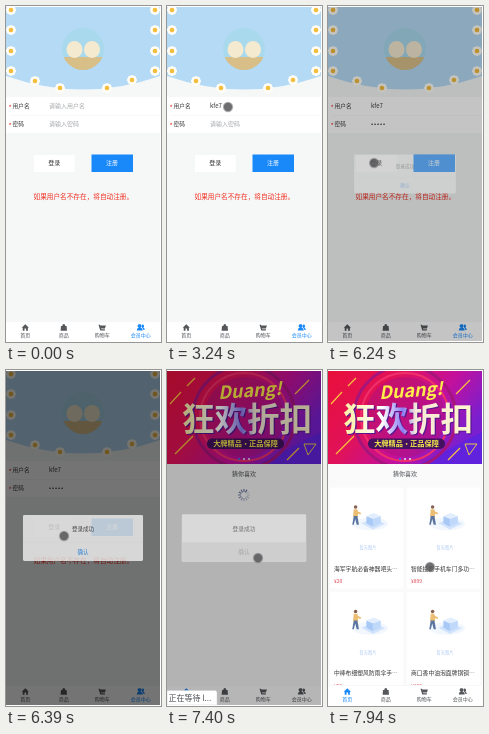
These frames come from a looping animation (155x336 px, 8 s). An HTML page:

```html
<!DOCTYPE html>
<html lang="zh-CN">
<head>
<meta charset="utf-8">
<title>Shop login</title>
<style>
html, body { margin: 0; width: 100%; height: 100%; overflow: hidden; background: #fff; }
svg { display: block; width: 100%; height: 100%; font-family: 'Noto Sans CJK SC', 'Noto Sans CJK', 'Noto Sans', sans-serif; }
#pass { font-family: 'Liberation Sans', sans-serif; letter-spacing: .9px; }
</style>
</head>
<body>
<svg id="stage" viewBox="0 0 155 336"></svg>
<script>
const LOOP = 8000;
const BLUE = '#1989fa', INK = '#323233', HINT = '#a6a8ac', PAGE = '#f6f8f8';

const text = (x, y, size, fill, str, extra = '') =>
  `<text x="${x}" y="${y}" font-size="${size}" fill="${fill}" ${extra}>${str}</text>`;
const mid = (x, y, size, fill, str, extra = '') =>
  text(x, y, size, fill, str, 'text-anchor="middle" ' + extra);
const rect = (x, y, w, h, fill, extra = '') =>
  `<rect x="${x}" y="${y}" width="${w}" height="${h}" fill="${fill}" ${extra}/>`;
const shape = (d, fill, extra = '') => `<path d="${d}" fill="${fill}" ${extra}/>`;
const ring = (n, fn) => Array.from({ length: n }, (_, i) => fn(i * 360 / n, i)).join('');

const defs = `<defs>
  <clipPath id="screen"><rect y="1" width="154" height="334"/></clipPath>
  <clipPath id="avatar"><circle cx="77" cy="43" r="21"/></clipPath>
  <clipPath id="banner"><rect y="1" width="154" height="93"/></clipPath>
  <linearGradient id="bannerFill" x2="1" y2=".45">
    <stop stop-color="#e80f3a"/><stop offset=".4" stop-color="#e0125a"/>
    <stop offset=".7" stop-color="#c4109a"/><stop offset="1" stop-color="#7a1fd0"/>
  </linearGradient>
  <linearGradient id="titleFill">
    <stop offset=".05" stop-color="#fff3b0"/><stop offset=".3" stop-color="#fff"/>
    <stop offset=".46" stop-color="#8a7cf2"/><stop offset=".56" stop-color="#f6e9d8"/>
    <stop offset="1" stop-color="#fff6cc"/>
  </linearGradient>
  <g id="flower">${ring(8, a => `<circle cy="-3.2" r="1.9" fill="#fffdf6" transform="rotate(${a})"/>`)}
    <circle r="3" fill="#fffdf6"/><circle r="2.3" fill="#f3bd3e"/></g>
  <g id="empty">
    <g transform="translate(10.5 9) scale(.72)" opacity=".75">
      <ellipse cx="41" cy="38" rx="25" ry="9" fill="#eef4fd"/>
      ${shape('M29 37 46 30 62 38 45 46Z', '#c3dafb')}
      ${shape('M36 27 45 31V42L36 37Z', '#8bb6f4')}${shape('M45 31 56 27V37L45 42Z', '#abcbf8')}
      ${shape('M36 27 46 23 56 27 45 31Z', '#d9e8fd')}
    </g>
    <g transform="translate(6 4) scale(.74)" opacity=".9">
      ${shape('M24 24H29L30 34H23Z', '#e9b765')}${shape('M24 33H29L31 45H28L26 37 24 45H22Z', '#4a6796')}
      ${shape('M28 26 34 29 33 31 27 29Z', '#e9b765')}<circle cx="26.5" cy="21" r="2.4" fill="#7a5140"/>
    </g>
    ${mid(38, 61.5, 4.2, '#b4cdf3', '暂无图片')}
  </g>
</defs>`;

function header() {
  const spots = [];
  for (const y of [4, 24, 45, 65]) spots.push([5, y], [149, y]);
  spots.push([29, 75], [126, 74], [54, 82], [101, 82]);
  return shape('M0 1H154V70Q77 97 0 70Z', '#b4daf5') +
    spots.map(([x, y]) => `<use href="#flower" x="${x}" y="${y}"/>`).join('') +
    `<g clip-path="url(#avatar)">${rect(56, 22, 42, 42, '#a9d9ec')}${rect(56, 51, 42, 13, '#d8bf88')}
      <ellipse cx="68.5" cy="43.5" rx="8" ry="8.5" fill="#f4ead0"/><ellipse cx="86" cy="43.5" rx="8" ry="8.5" fill="#f4ead0"/></g>`;
}

const field = (y, label, id, hint) => text(2.4, y + 1.4, 7, '#e8352a', '*') +
  text(6.6, y, 5.7, INK, label) +
  text(43, y, 6, HINT, hint, `id="${id}Hint"`) + text(43, y, 6, INK, '', `id="${id}"`);

const loginPage = `<g id="login">${header()}
  ${rect(0, 91, 154, 36, '#fff')}${rect(4, 109, 150, .4, '#ebedf0')}
  ${field(102.2, '用户名', 'user', '请输入用户名')}
  ${field(120.2, '密码', 'pass', '请输入密码')}
  ${rect(28, 149, 40.5, 17, '#fff', 'id="loginBtn"')}${mid(48.3, 159.3, 6, INK, '登录')}
  ${rect(85.5, 148.5, 41.5, 17.5, BLUE)}${mid(106, 159.3, 6, '#fff', '注册')}
  ${text(27.5, 192.5, 6.65, '#f02b1d', '如果用户名不存在，将自动注册。')}
</g>`;

const halo = (r, color, width) =>
  `<circle cx="77" cy="47" r="${r}" fill="none" stroke="${color}" stroke-width="${width}"/>`;

const banner = `<g clip-path="url(#banner)">
  ${rect(0, 1, 154, 93, 'url(#bannerFill)')}
  ${shape('M154 62V94H92Z', '#5a24e0', 'opacity=".8"')}
  <circle cx="77" cy="47" r="40" fill="#b0127e" opacity=".55"/>
  ${halo(44, '#f0306a', 2)}${halo(51, '#a5157c', 3)}
  ${shape('M137 74H149L141 85Z', 'none', 'stroke="#f7d93a" stroke-width=".9"')}
  ${shape('M3 34 14 22M8 84 26 66M128 24 142 10M120 90 132 78M20 16 28 8', 'none', 'stroke="#ffc23d" stroke-width="1.2"')}
  ${mid(83, 27, 18, '#ffee4a', 'Duang!', 'font-weight="700" font-style="italic" transform="rotate(-4 83 22)"')}
  ${mid(80, 61, 32.5, '#5a1590', '狂欢折扣', 'font-weight="900" transform="translate(1.2 1.2)"')}
  ${mid(80, 61, 32.5, 'url(#titleFill)', '狂欢折扣', 'font-weight="900"')}
  ${rect(40, 68.5, 77, 10.5, '#43115f', 'rx="5"')}
  ${mid(78.5, 76.4, 7.2, '#f3ee4a', '大牌精品·正品保障', 'font-weight="700"')}
  ${[72, 77, 82].map((x, i) => `<circle cx="${x}" cy="89" r="1" fill="${i ? '#eee' : BLUE}"/>`).join('')}
</g>`;

const card = (x, y, name, price) => `<g transform="translate(${x} ${y})">
  ${rect(0, 0, 73, 101, '#fff', 'rx="1"')}<use href="#empty"/>
  ${text(4, 83.3, 5.8, INK, name + '…')}${text(4, 95.8, 5, '#d8404c', '¥' + price)}</g>`;

const homePage = `<g id="home">${rect(0, 94, 154, 222, '#fafafa')}${banner}
  ${mid(77, 106.2, 6, '#4a4c50', '猜你喜欢')}
  <g id="spinner">${ring(12, (a, i) =>
    rect(-.5, -6, 1, 3, '#3d4f86', `opacity="${.2 + i * .07}" transform="rotate(${a})"`))}</g>
  <g id="goods">
    ${card(2, 117.5, '海军宇航必备神器吧头', 20)}${card(79, 117.5, '智能投影手机车门多功', 899)}
    ${card(2, 222, '中棒布细塑风防雨伞手', 59)}${card(79, 222, '商口香中油泡面牌锅铜', 128)}
  </g></g>`;

const icons = [
  'M-3.6 .2 0 -3.3 3.6 .2H2.6V3.2H.8V1H-.8V3.2H-2.6V.2Z',
  'M-2.8 -1.4H-1.5Q-1.4 -3.4 0 -3.4T1.5 -1.4H2.8L3.2 3.2H-3.2Z',
  'M-3.8 -2.8H-2.4L-2 -2H3.6L2.6 1H-1.4L-1 1.7H2.6V3H-2Z',
  'M-1.2 -3.2A1.7 1.7 0 0 1 -.4 .1Q2 .6 2 3H-4Q-4 .6 -2 .1A1.7 1.7 0 0 1 -1.2 -3.2ZM1.2 -2.8A1.5 1.5 0 0 1 2.4 0Q4 .6 4 2.6H2.6Q2.4 .8 1 0Z'
];
const tabs = rect(0, 315, 154, 20, '#fff') + rect(0, 315, 154, .4, '#e8eaed') +
  ['首页', '商品', '购物车', '会员中心'].map((name, i) => {
    const x = 19.3 + i * 38.5;
    return `<g class="tab"><path d="${icons[i]}" transform="translate(${x} 321.5)"/>
      <text x="${x}" y="331" font-size="5" text-anchor="middle">${name}</text></g>`;
  }).join('');

const dialog = `<g id="dialog">${rect(11.5, 143, 131, 50, '#fff', 'rx="1.5"')}
  ${rect(11.5, 172.5, 131, 20.5, '#e9eaec', 'id="okFill"')}
  ${rect(11.5, 172.3, 131, .3, '#ebedf0')}
  ${mid(77, 160.3, 6, INK, '登录成功', 'font-weight="500"')}${mid(77, 185.2, 6, BLUE, '确认', 'id="ok"')}</g>`;

const bubble = `<g id="bubble">${shape('M0 320.5H48Q50 320.5 50 322.5V335H0Z', '#fff', 'stroke="#c9cbce" stroke-width=".5"')}
  ${text(1.5, 330.5, 8, '#4c4f54', '正在等待 l...')}</g>`;

document.getElementById('stage').innerHTML = defs + rect(0, 0, 155, 336, '#fff') +
  `<g clip-path="url(#screen)">${rect(0, 1, 154, 334, PAGE)}${loginPage}${homePage}${tabs}
    ${rect(0, 1, 154, 334, '#000', 'id="mask"')}${dialog}${bubble}
    <g id="cursor"><circle r="5.2" fill="#777" opacity=".55"/><circle r="4.2" fill="#505054" opacity=".7"/></g></g>`;

const el = id => document.getElementById(id);
const tabEls = [...document.querySelectorAll('.tab')];
const set = (id, attrs) => { for (const k in attrs) el(id).setAttribute(k, attrs[k]); };
const show = (id, on) => set(id, { display: on ? 'inline' : 'none' });
const ramp = (t, a, b) => Math.min(1, Math.max(0, (t - a) / (b - a)));

// time, x, y
const track = [
  [170, 122, 313], [930, 56, 91], [1010, 60, 96], [1160, 60, 97], [1390, 54, 108],
  [1540, 56, 109], [1620, 56, 104], [1800, 56, 104], [1850, 61, 101], [5120, 61, 101],
  [5360, 46, 150], [5600, 49, 158], [5750, 48, 161], [6010, 47, 158], [6240, 46, 157],
  [6860, 95.5, 194], [7010, 96, 193], [7090, 90, 187], [7400, 91, 188], [7940, 102, 197]
];
function along(t) {
  let i = track.findIndex(k => k[0] > t);
  if (i < 0) return track[track.length - 1].slice(1);
  if (i === 0) i = 1;
  const [a, b] = [track[i - 1], track[i]], p = ramp(t, a[0], b[0]);
  return [a[1] + (b[1] - a[1]) * p, a[2] + (b[2] - a[2]) * p];
}

const userKeys = [2080, 2540, 2860, 3240], passKeys = [3720, 4020, 4340, 4500, 4660];

function type(id, str, keys, t) {
  const value = str.slice(0, keys.filter(k => k <= t).length);
  el(id).textContent = value;
  show(id + 'Hint', !value);
}

function render(t) {
  const home = t >= 7240;
  show('login', !home);
  show('home', home);
  type('user', 'kfe7', userKeys, t);
  type('pass', '•••••', passKeys, t);
  set('loginBtn', { fill: t >= 5750 && t < 6010 ? '#eceef0' : '#fff' });

  // The mask runs slightly ahead of the dialog.
  const open = t >= 6240;
  const enter = open ? ramp(t, 6160, 6480) : 0, leave = ramp(t, 7240, 7560);
  const dim = open ? ramp(t, 6130, 6450) * (1 - ramp(t, 7230, 7530)) : 0;
  const scale = leave ? 1 - .1 * leave : .7 + .3 * enter;
  set('mask', { opacity: .67 * dim });
  set('dialog', {
    opacity: enter * (1 - leave),
    transform: `translate(77 168) scale(${scale}) translate(-77 -168)`
  });
  show('okFill', home);
  set('ok', { fill: home ? '#9a9ca0' : BLUE });

  const loaded = t >= 7640;
  show('goods', loaded);
  show('spinner', !loaded);
  set('spinner', { transform: `translate(77 125) rotate(${Math.floor(t / 67) * 30})` });
  show('bubble', home && t < 7720);

  tabEls.forEach((tab, i) => tab.setAttribute('fill', i === (home ? 0 : 3) ? BLUE : '#55575b'));
  show('cursor', t >= 170);
  set('cursor', { transform: `translate(${along(t).join(' ')})` });
}

const start = performance.now();
function tick() {
  render((performance.now() - start) % LOOP);
  requestAnimationFrame(tick);
}
tick();
</script>
</body>
</html>
```
